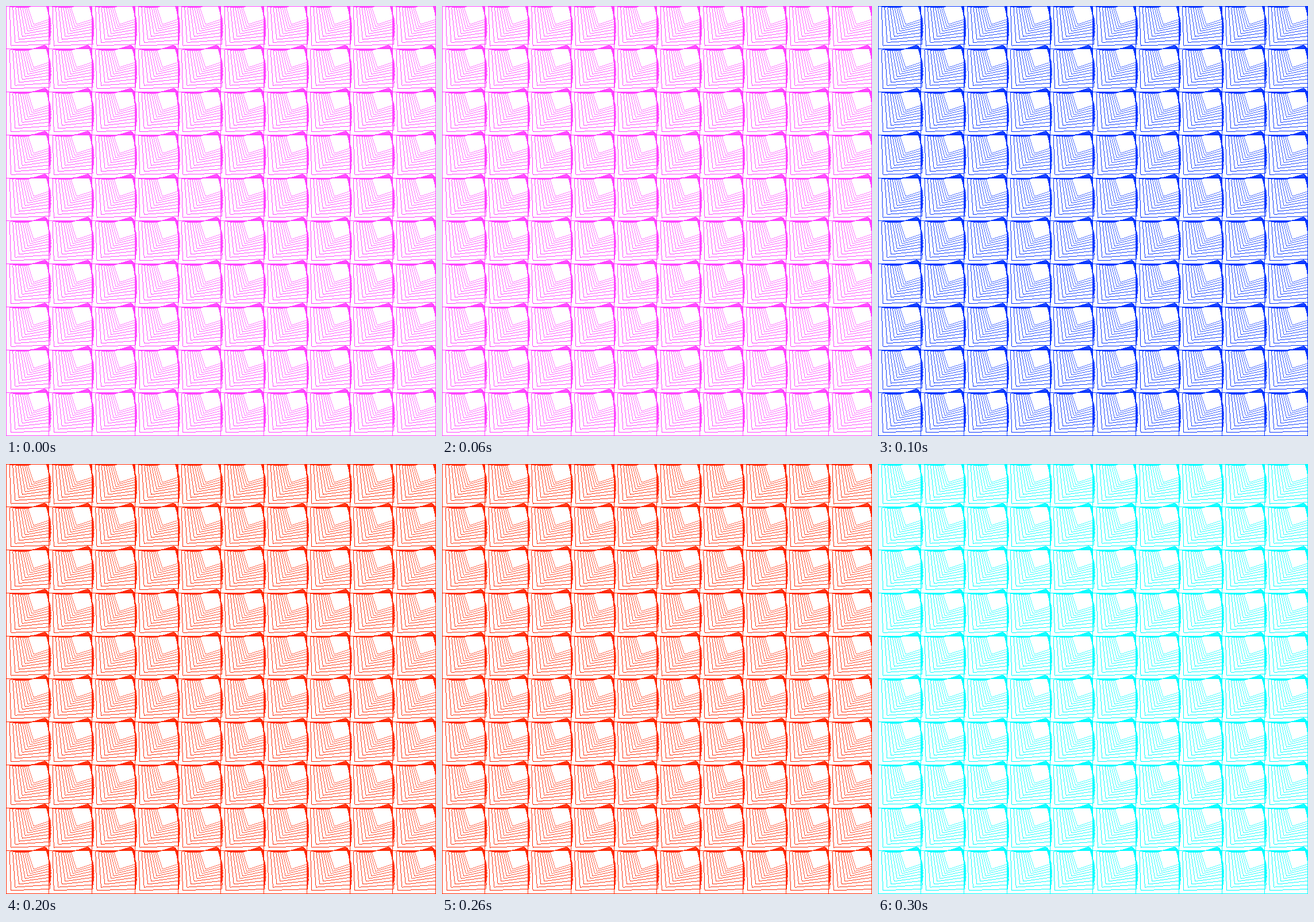
Write an HTML page that moves like this. It is 748 by 748 pixels and loops after 400 ms.

```html
<!DOCTYPE html>
<html lang="en">
<head>
<meta charset="utf-8">
<title>Twisting squares</title>
<style>
  html, body { margin: 0; width: 100%; height: 100%; overflow: hidden; background: #fff; }
  svg { display: block; width: 748px; height: 748px; }
  path { fill: none; shape-rendering: crispEdges; }
</style>
</head>
<body>
<svg id="pattern" viewBox="0 0 748 748"></svg>
<script>
const COLORS = ['#ff40ff', '#0433ff', '#ff2600', '#00fdff'];
const STEP_MS = 100;
const CELLS = 10, PITCH = 74.75, SQUARES = 10;
const SHRINK = 0.907, TURN = -2 * Math.PI / 180;
const SHIFT = { x: 6, y: 1.1 };
const LINE_WIDTH = 1.05;

const pattern = document.getElementById('pattern');

function squarePath(x, y, size, angle) {
  const dx = size * Math.cos(angle), dy = size * Math.sin(angle);
  return `M${x} ${y}l${dx} ${dy}l${-dy} ${dx}l${-dx} ${-dy}z`;
}

// Draws one nesting level in every cell as a single path.
function addLevel(x, y, scale, angle) {
  let d = '';
  for (let row = 0; row < CELLS; row++)
    for (let column = 0; column < CELLS; column++)
      d += squarePath(column * PITCH + x, row * PITCH + y, PITCH * scale, angle);
  const path = document.createElementNS('http://www.w3.org/2000/svg', 'path');
  path.setAttribute('d', d);
  path.setAttribute('stroke-width', LINE_WIDTH * Math.sqrt(scale));
  pattern.append(path);
}

// Each square is the previous one shifted, turned and shrunk in its own frame.
let x = 0.2, y = 0.2;
for (let i = 0; i < SQUARES; i++) {
  const scale = SHRINK ** i, angle = TURN * i;
  addLevel(x, y, scale, angle);
  const cos = scale * Math.cos(angle), sin = scale * Math.sin(angle);
  x += SHIFT.x * cos - SHIFT.y * sin;
  y += SHIFT.x * sin + SHIFT.y * cos;
}

function draw() {
  const step = Math.floor(performance.now() / STEP_MS) % COLORS.length;
  pattern.setAttribute('stroke', COLORS[step]);
  requestAnimationFrame(draw);
}
draw();
</script>
</body>
</html>
```
